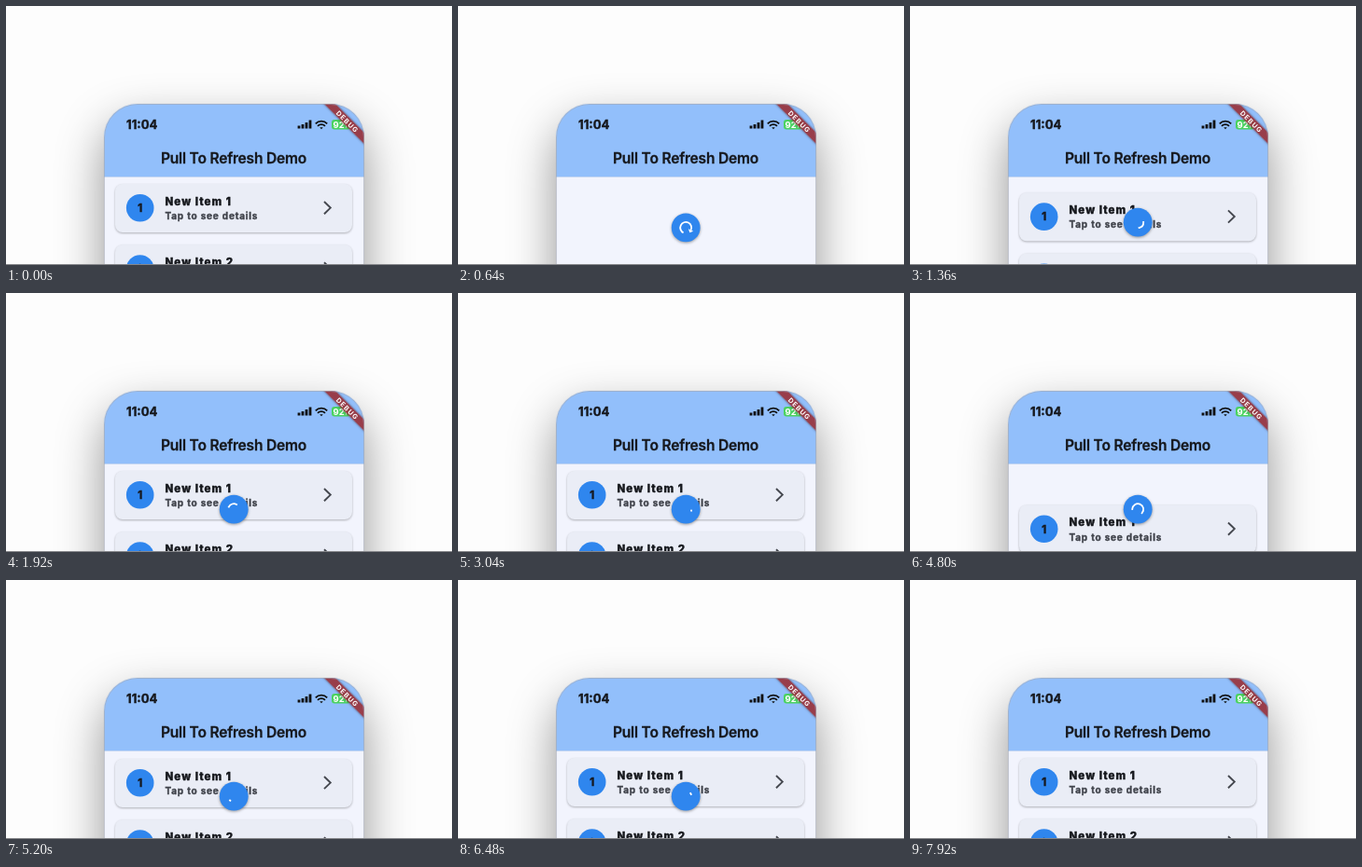
An HTML page for the animation above (8 s loop, 478 px wide and 278 px high).

```html
<!DOCTYPE html>
<html lang="en">
<head>
<meta charset="utf-8">
<title>Pull To Refresh Demo</title>
<style>
  html, body { margin: 0; width: 100%; height: 100%; overflow: hidden; background: #fdfdfd; }
  .stage { position: relative; width: 100%; height: 100%; overflow: hidden; contain: strict; }
  svg { position: absolute; left: 0; top: 0; display: block; overflow: hidden; }
  .phone {
    position: absolute; left: 105px; top: 105px; width: 279px; height: 600px; border-radius: 36px;
    background: #f2f4fd; box-shadow: 0 0 1px #a9acb2, 0 22px 50px rgba(0, 0, 0, .42);
  }
  text { font-family: Inter, sans-serif; font-weight: 700; fill: #16181d; stroke: #16181d; stroke-width: .4px; }
  .title { font-size: 15.5px; font-weight: 600; letter-spacing: -.18px; stroke-width: .3px; }
  .card { filter: drop-shadow(0 1px 1px rgba(0, 0, 0, .28)); }
  .name { font-size: 11.5px; font-weight: 800; letter-spacing: 1.04px; }
  .hint { font-size: 10px; letter-spacing: .81px; fill: #41444c; stroke: #41444c; }
  .light { fill: #fff; stroke: none; }
  .ribbon { filter: drop-shadow(0 0 1.5px rgba(0, 0, 0, .4)); }
  #spinner { filter: drop-shadow(0 1px 1.5px rgba(0, 0, 0, .38)); }
</style>
</head>
<body>
<div class="stage">
<div class="phone"></div>
<svg width="478" height="278" viewBox="0 0 478 278">
  <defs>
    <clipPath id="screen"><rect x="105" y="105" width="279" height="600" rx="36"/></clipPath>
    <clipPath id="body"><rect x="105" y="183" width="279" height="95"/></clipPath>
  </defs>

  <g clip-path="url(#body)">
    <g id="list"></g>
    <g id="spinner">
      <circle r="15.4" fill="#2f86ee"/>
      <g id="mark">
        <path id="arc" fill="none" stroke="#fff" stroke-width="1.8"/>
        <path id="arrow" fill="#fff"/>
      </g>
    </g>
  </g>

  <g clip-path="url(#screen)">
    <rect x="105" y="183" width="279" height="1" fill="#c3d6f2"/>
    <rect x="105" y="105" width="279" height="78" fill="#92bffb"/>
    <text x="129" y="132" font-size="13.1">11:04</text>
    <text class="title" x="244" y="169" text-anchor="middle">Pull To Refresh Demo</text>
    <path d="M314 131.5v-3M318 131.5v-4.5M322 131.5v-6.5M326 131.5v-9" stroke="#111" stroke-width="2.8"/>
    <g fill="none" stroke="#111" stroke-width="1.9">
      <path d="M331.8 126.3a8.6 8.6 0 0 1 12.4 0M334 128.8a5.6 5.6 0 0 1 8 0"/>
      <path d="M336.2 130.2h3.6l-1.8 2z" fill="#111" stroke="none"/>
    </g>
    <rect x="349" y="122" width="20" height="10.5" rx="3" fill="#4bd261"/>
    <text class="light" x="350.5" y="130.8" font-size="9.5">92</text>
    <path d="M365.5 123.5l-3 4.3h2.2l-.7 3.7 3-4.5h-2.2z" fill="#fff"/>
    <g transform="translate(365.5 123.5) rotate(45)">
      <rect class="ribbon" x="-40" y="-4.3" width="80" height="8.6" fill="#993641" opacity=".95"/>
      <text class="light" x=".8" y="3" font-size="7.2" letter-spacing="1.1" text-anchor="middle">DEBUG</text>
    </g>
    <rect x="105.5" y="105.5" width="278" height="600" rx="35.5" fill="none" stroke="#a4a9b2" opacity=".6"/>
  </g>
  <rect y="277" width="478" height="1" fill="#85868a"/>
</svg>
</div>
<script>
const LOOP = 8000, PEAK = 140, FULL_DRAG = 132, SNAP = 150, REFRESH = 2000, SHRINK = 200;
const PULLS = [{ start: 60, release: 910 }, { start: 3980, release: 4500 }];
const ROW = 65.2, RADIUS = 6, STROKE = 1.8;
const $ = id => document.getElementById(id);
const clamp = x => Math.min(1, Math.max(0, x));
const mix = (a, b, k) => a + (b - a) * k;

$('list').innerHTML = [1, 2].map(n => `
  <g transform="translate(0 ${(n - 1) * ROW})">
    <rect class="card" x="117" y="191" width="254" height="52" rx="8" fill="#eaedf6"/>
    <circle cx="143.7" cy="216.8" r="14.8" fill="#2f86ee"/>
    <text x="143.7" y="221" font-size="11.5" text-anchor="middle">${n}</text>
    <text class="name" x="170.5" y="213.7">New Item ${n}</text>
    <text class="hint" x="170.5" y="229">Tap to see details</text>
    <path d="M341 210l6.8 6.6-6.8 6.6" fill="none" stroke="#45484f" stroke-width="1.9"/>
  </g>`).join('');

// cubic-bezier(.4, 0, .2, 1)
function ease(x) {
  if (x <= 0 || x >= 1) return clamp(x);
  let lo = 0, hi = 1, s;
  for (let i = 0; i < 24; i++) {
    s = (lo + hi) / 2;
    const bx = 1.2 * s * (1 - s) ** 2 + .6 * s * s * (1 - s) + s ** 3;
    if (bx < x) lo = s; else hi = s;
  }
  return 3 * s * s * (1 - s) + s ** 3;
}

// Angles in units of pi; ms is the time within the spinning cycle.
function drawMark(ms, drag, arrowScale) {
  const phase = ms / 1333 % 1;
  const head = ease(phase * 2), tail = ease(phase * 2 - 1);
  const twist = drag < .33 ? mix(-.1, -.2, drag / .33) : mix(-.2, 1.35, (drag - .33) / .67);
  const from = (-.5 + tail * 1.5 + ms / 2222 * 2 + phase * .5 + twist) * Math.PI;
  const sweep = Math.max((head - tail) * 1.5 * Math.PI, .02), to = from + sweep;
  const at = (a, r) => `${(r * Math.cos(a)).toFixed(3)} ${(r * Math.sin(a)).toFixed(3)}`;
  $('arc').setAttribute('d', `M${at(from, RADIUS)}A${RADIUS} ${RADIUS} 0 ${+(sweep > Math.PI)} 1 ${at(to, RADIUS)}`);
  $('arc').setAttribute('stroke-linecap', arrowScale ? 'butt' : 'square');
  const size = STROKE * 2 * arrowScale;
  const tip = `${RADIUS * Math.cos(to) - size * Math.sin(to)} ${RADIUS * Math.sin(to) + size * Math.cos(to)}`;
  $('arrow').setAttribute('d', size ? `M${at(to, RADIUS - size)}L${at(to, RADIUS + size)}L${tip}Z` : '');
}

function draw(t) {
  const { start, release } = t < PULLS[1].start ? PULLS[0] : PULLS[1];
  const spin = t - release - SNAP;
  const pulled = PEAK * clamp((t - start) / (release - start));
  const offset = t < release ? pulled : Math.min(PEAK, 560 * Math.exp(-.00907 * (t - release)));
  $('list').setAttribute('transform', `translate(0 ${offset < .1 ? 0 : offset})`);

  const value = mix(clamp(pulled / FULL_DRAG), 2 / 3, clamp((t - release) / SNAP));
  const scale = 1 - clamp((spin - REFRESH) / SHRINK);
  const y = 166.7 + 65.5 * 1.5 * value;
  $('spinner').style.display = pulled > 0 && scale > 0 ? '' : 'none';
  $('spinner').setAttribute('transform', `translate(244.2 ${y}) scale(${scale})`);
  $('mark').setAttribute('opacity', clamp(value * 1.5));

  const drag = .75 * value;
  const wound = 666.5 * clamp((drag - .1) / .23);
  drawMark(wound + Math.max(0, spin), drag, spin < 0 ? clamp(drag * 1.5) : 0);
}

function tick() {
  draw(performance.now() % LOOP);
  requestAnimationFrame(tick);
}
tick();
</script>
</body>
</html>
```
